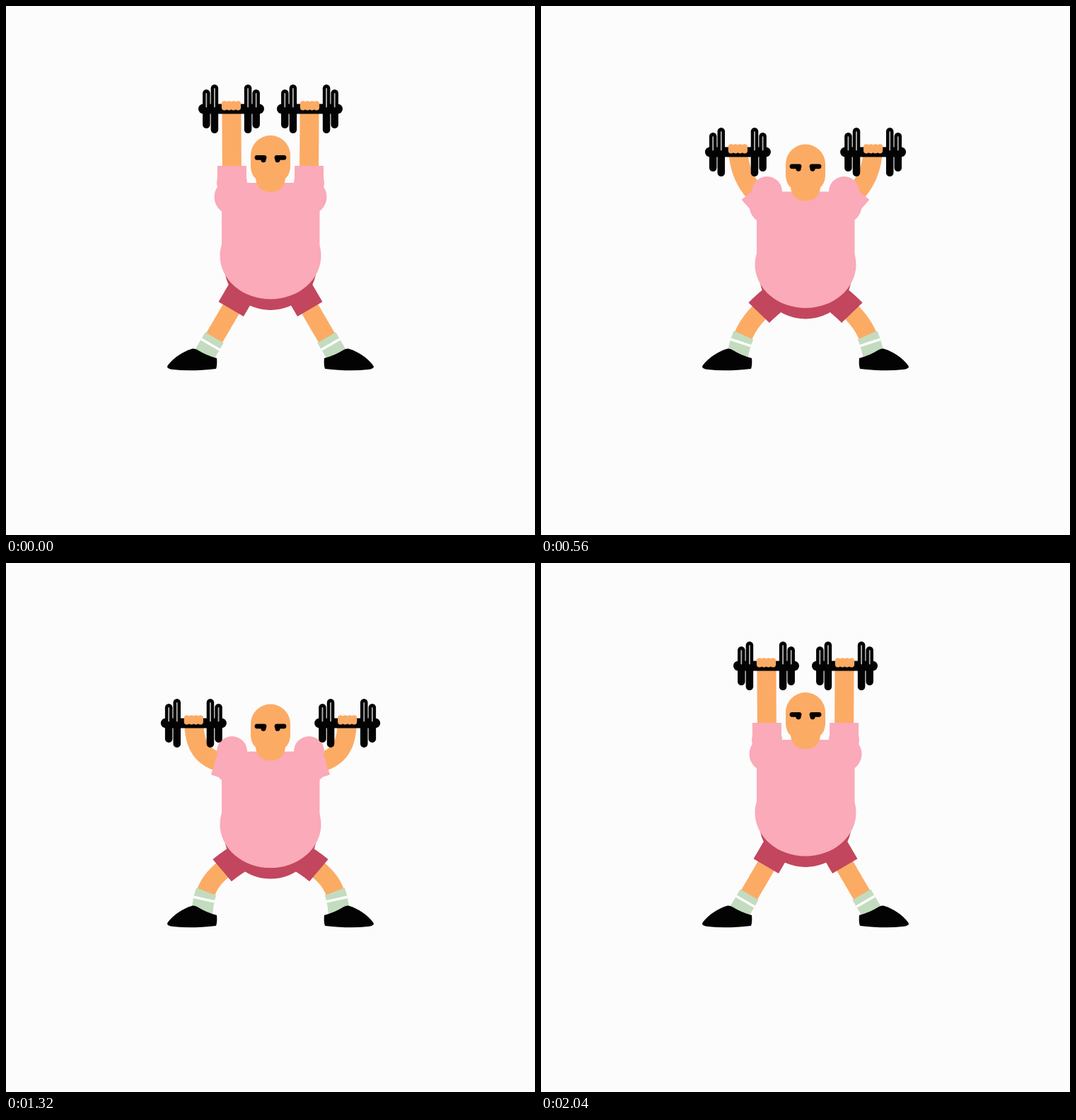
Write an HTML page with a canvas that moves like this. It is 748 by 748 pixels and loops after 2080 ms.

```html
<!DOCTYPE html>
<html lang="en">
<head>
<meta charset="utf-8">
<title>Dumbbell press</title>
<style>
html, body { margin: 0; width: 100%; height: 100%; overflow: hidden; background: #fcfcfc; }
canvas { display: block; width: 748px; height: 748px; }
</style>
</head>
<body>
<canvas id="stage" width="748" height="748"></canvas>
<script>
const ctx = document.getElementById('stage').getContext('2d');
const LOOP = 2080, STEP = 40, DOWN = 1010, END = 2008;
const SKIN = '#fcab64', PINK = '#faaab8', SHORTS = '#c2465e',
      SOCK = '#c3dcbf', BLACK = '#030303', BG = '#fcfcfc';

const smooth = s => s * s * (3 - 2 * s);

// 0 = arms up, 1 = deepest squat
function squat(t) {
  if (t < DOWN) return smooth(t / DOWN);
  return 1 - smooth(Math.min(1, (t - DOWN) / (END - DOWN)));
}

function curve(p, a, b, q, n = 80) {
  const pts = [];
  for (let i = 0; i <= n; i++) {
    const t = i / n, s = 1 - t;
    const at = k => s * s * s * p[k] + 3 * s * s * t * a[k] + 3 * s * t * t * b[k] + t * t * t * q[k];
    pts.push([at(0), at(1)]);
  }
  return pts;
}

// the first part of a polyline, cut at a given length
function cut(pts, len) {
  const out = [pts[0]];
  for (let i = 1; i < pts.length; i++) {
    const [x, y] = pts[i - 1], [u, v] = pts[i];
    const d = Math.hypot(u - x, v - y);
    if (d >= len) {
      out.push([x + (u - x) * len / d, y + (v - y) * len / d]);
      break;
    }
    out.push(pts[i]);
    len -= d;
  }
  return out;
}

function stroke(pts, width, color, cap = 'butt') {
  ctx.beginPath();
  pts.forEach(([x, y]) => ctx.lineTo(x, y));
  ctx.lineWidth = width;
  ctx.lineCap = cap;
  ctx.lineJoin = 'round';
  ctx.strokeStyle = color;
  ctx.stroke();
}

function oval(x, y, rx, ry, color) {
  ctx.beginPath();
  ctx.ellipse(x, y, rx, ry, 0, 0, 7);
  ctx.fillStyle = color;
  ctx.fill();
}

function bothSides(draw) {
  draw();
  ctx.save();
  ctx.translate(748, 0);
  ctx.scale(-1, 1);
  draw();
  ctx.restore();
}

function shoe() {
  ctx.fillStyle = BLACK;
  ctx.fill(new Path2D('M228 510C231 503 247 489 264 484.5Q268 484 272 487Q283 494 298 498' +
    'Q299 507 297 513Q262 517 236 514Q228 513 228 510Z'));
}

function leg(u, dy) {
  const hip = [342 + 3 * u, 388 + dy + 4.5 * u], foot = [277, 499];
  const a = [hip[0] - 21.7 - 30 * u - 10 * u * u, hip[1] + 37 - 7 * u];
  const b = [foot[0] + 21.7 - 24.6 * u, foot[1] - 37 - 12.5 * u];
  const down = curve(hip, a, b, foot), up = down.slice().reverse();
  stroke(down, 26.5, SKIN);
  stroke(cut(up, 35), 30, SOCK);
  const top = cut(up, 25.5).pop(), bottom = cut(up, 22).pop();
  stroke([bottom, top], 30, '#fff');
  shoe();
  stroke(cut(down, 47), 41, SHORTS);
}

function arm(u, dy) {
  const s = [319.5, 270 + dy], h = [319 - 69 * u, 147 + 105 * u];
  const a = [s[0] - 39 * u * u, s[1] - 41 + 45 * u];
  const b = [h[0] + 20 * u - 24 * u * u, h[1] + 41 - 22 * u + 41 * u * u];
  const line = curve(s, a, b, h);
  stroke(line, 27, SKIN);
  stroke(cut(line, 44 - 20 * u - 9 * u * u), 41, PINK);
}

function dumbbell(u) {
  ctx.save();
  ctx.translate(318.5 - 69 * u, 145.5 + 105 * u);
  stroke([[-39.5, 0], [39.5, 0]], 14, BLACK, 'round');
  for (const x of [-35.2, -23.6, 23.6, 35.2]) {
    const r = Math.abs(x) < 30 ? 34.5 : 27.5;
    stroke([[x, 5.25 - r], [x, r - 5.25]], 10.5, BLACK, 'round');
    stroke([[x, 6 - r], [x, -3]], 1.8, '#b4b4b4', 'round');
  }
  for (const x of [-9.6, -3.2, 3.2, 9.6]) {
    stroke([[x, -7.2], [x, -2]], 8, SKIN, 'round');
  }
  ctx.restore();
}

function torso() {
  bothSides(() => {
    oval(319.5, 250, 21.5, 21.5, PINK);
    oval(319.5, 270, 25, 25, PINK);
  });
  ctx.fillStyle = PINK;
  ctx.fillRect(305, 250, 138.5, 105);
  oval(374, 353, 71.5, 61.5, PINK);
}

function head() {
  ctx.fillStyle = SKIN;
  ctx.fill(new Path2D('M346 211A28 28 0 0 1 402 211V228Q401 239 395 244' +
    'C394 256 386 263 374 263S354 256 353 244Q347 239 346 228Z'));
  bothSides(() => {
    stroke([[355, 214.3], [365, 214.3]], 6.8, BLACK, 'round');
    oval(364, 217.3, 3.6, 4, BLACK);
  });
}

function draw(t) {
  const u = squat(t), dy = 21.5 * u;
  ctx.fillStyle = BG;
  ctx.fillRect(0, 0, 748, 748);
  bothSides(() => leg(u, dy));
  oval(374, 369 + dy, 65, 61, SHORTS);
  bothSides(() => arm(u, dy));
  ctx.save();
  ctx.translate(0, dy);
  torso();
  head();
  ctx.restore();
  bothSides(() => dumbbell(u));
}

const start = performance.now();
function tick() {
  const t = (performance.now() - start) % LOOP;
  draw(Math.floor(t / STEP) * STEP);
  requestAnimationFrame(tick);
}
tick();
</script>
</body>
</html>
```
